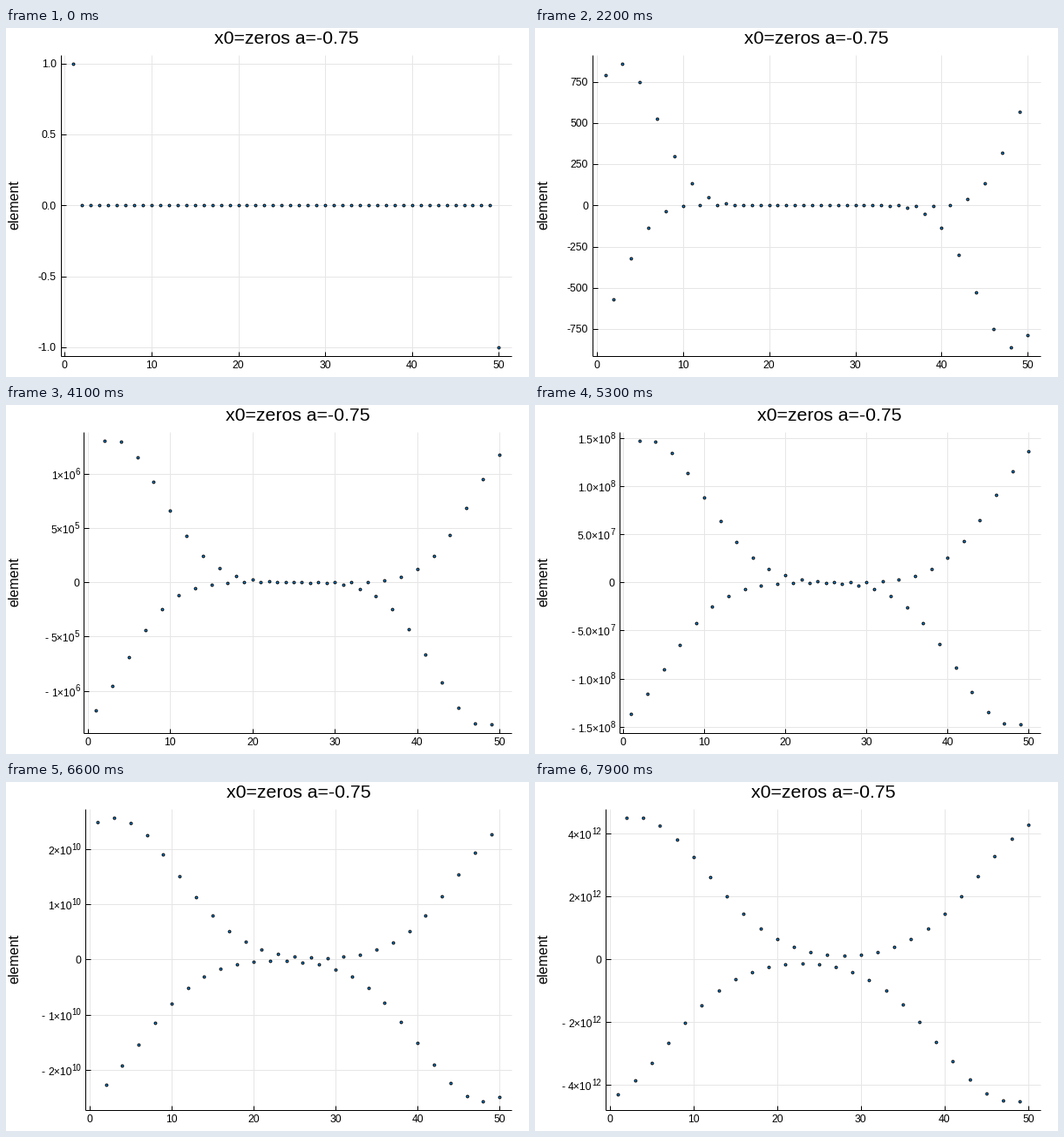
Write a matplotlib script that moves like this. It is 600 by 400 pixels and loops after 8000 ms.

```python
import math

import matplotlib.pyplot as plt
import numpy as np
from matplotlib.animation import FuncAnimation

plt.rcParams["font.family"] = "Liberation Sans"

W, H = 600, 400
TOP, BOTTOM, RIGHT = 31.2, 375.5, 580.0
FRAMES = 80
N = 50
A = -0.75
PT = 0.72  # points per pixel at 100 dpi
EM = 12.15  # tick label size in pixels
SUP = 0.8  # relative size of exponents
GRID = "#e6e6e6"
BLUE = "#009afa"

NICE = [(1, 1.0), (5, 0.9), (2, 0.7), (2.5, 0.5), (3, 0.2)]
GLYPH = {"-": 0.333, ".": 0.278, "×": 0.584}
# room the layout reserves for exponent digits 0 to 9
EXP_ROOM = [1.166, 0.333, 0.333, 0.333, 1.099, 1.342, 1.303, 1.044, 1.099, 1.099]


def iterate():
    """x <- -a * (left + right neighbour) + b on a ring, from zeros."""
    b = np.zeros(N)
    b[0], b[-1] = 1, -1
    x, states = np.zeros(N), []
    for _ in range(FRAMES):
        x = -A * (np.roll(x, 1) + np.roll(x, -1)) + b
        states.append(x)
    return states


def find_ticks(lim):
    """Best-scoring round ticks for the range -lim..lim."""
    best = None
    z = math.floor(math.log10(lim))
    for power in (z - 1, z):
        for q, nice in NICE:
            step = q * 10.0 ** power
            n = math.floor(lim / step + 1e-9)
            if n not in (2, 3):
                continue
            count = 1 - abs(2 * n - 4) / 5
            score = 0.25 * count + 0.5 * lim / (n * step) + 0.25 * nice
            if best is None or score > best[0]:
                best = score, step, n
    _, step, n = best
    return [i * step for i in range(-n, n + 1)]


def decimals(values):
    return max(len(f"{v:g}".partition(".")[2]) for v in values)


def make_labels(ticks):
    """Pairs of (base, exponent) text; exponent is empty for plain numbers."""
    if math.log10(ticks[-1] - ticks[0]) <= 4 + 1e-9:
        d = decimals(ticks)
        return [(f"{v:.{d}f}", "") for v in ticks]
    exps = [math.floor(math.log10(abs(v)) + 1e-9) if v else 0 for v in ticks]
    mants = [v / 10.0 ** e for v, e in zip(ticks, exps)]
    d = decimals(mants)
    return [(f"{m:.{d}f}×10", str(e)) if m else ("0", "")
            for m, e in zip(mants, exps)]


def width(text):
    return sum(GLYPH.get(c, 0.556) for c in text)


def reserved(label):
    base, exp = label
    return width(base) + sum(EXP_ROOM[int(c)] for c in exp)


fig = plt.figure(figsize=(W / 100, H / 100), dpi=100, facecolor="white")
stage = fig.add_axes([0, 0, 1, 1])
states = iterate()


def put(x, y, text, size=EM, **kw):
    stage.text(x, y, text, fontsize=size * PT, color="black",
               va="baseline", **kw)


def line(x0, y0, x1, y1, color="black", z=2):
    stage.plot([x0, x1], [y0, y1], color=color, lw=PT, zorder=z,
               solid_capstyle="butt")


def draw_label(right, y, label):
    base, exp = label
    if not exp:
        put(right, y + 4.3, base, ha="right")
        return
    x = right - width(exp) * SUP * EM
    put(x, y + 0.8, exp, SUP * EM)
    digits = base.lstrip("-")
    x -= width(digits) * EM
    put(x, y + 5.9, digits)
    if base[0] == "-":
        put(x - 3.5 - GLYPH["-"] * EM, y + 5.9, "-")


def draw(i):
    stage.clear()
    stage.set(xlim=(0, W), ylim=(H, 0))
    stage.axis("off")

    x = states[i]
    lim = 1.06 * np.abs(x).max()
    ticks = find_ticks(lim)
    labels = make_labels(ticks)
    left = 41.7 + EM * max(map(reserved, labels))

    margin = 0.03 * (N - 1)
    unit = (RIGHT - left) / (N - 1 + 2 * margin)

    def px(v):
        return left + (v - 1 + margin) * unit

    def py(v):
        return (TOP + BOTTOM) / 2 - v / lim * (BOTTOM - TOP) / 2

    xlen = 0.012 * (RIGHT - left)
    ylen = 0.012 * (BOTTOM - TOP)

    for v in range(0, N + 1, 10):
        line(px(v), TOP, px(v), BOTTOM, GRID, 1)
        line(px(v), BOTTOM, px(v), BOTTOM - ylen)
        put(px(v), 390.2, str(v), ha="center")
    for v, label in zip(ticks, labels):
        line(left, py(v), RIGHT, py(v), GRID, 1)
        line(left, py(v), left + xlen, py(v))
        draw_label(left - 5, py(v), label)
    line(left, TOP, left, BOTTOM)
    line(left, BOTTOM, RIGHT, BOTTOM)

    stage.plot(px(np.arange(1, N + 1)), py(x), "o", ms=2.9 * PT, mfc=BLUE,
               mec="black", mew=PT, zorder=3, snap=False)

    put((left + RIGHT) / 2, 18.4, f"x0=zeros a={A}", 21.3, ha="center")
    put(14.4, 203, "element", 16, ha="center", rotation=90,
        rotation_mode="anchor")


anim = FuncAnimation(fig, draw, frames=FRAMES, init_func=lambda: None,
                     interval=100, repeat=True, repeat_delay=0)
plt.show()
```
